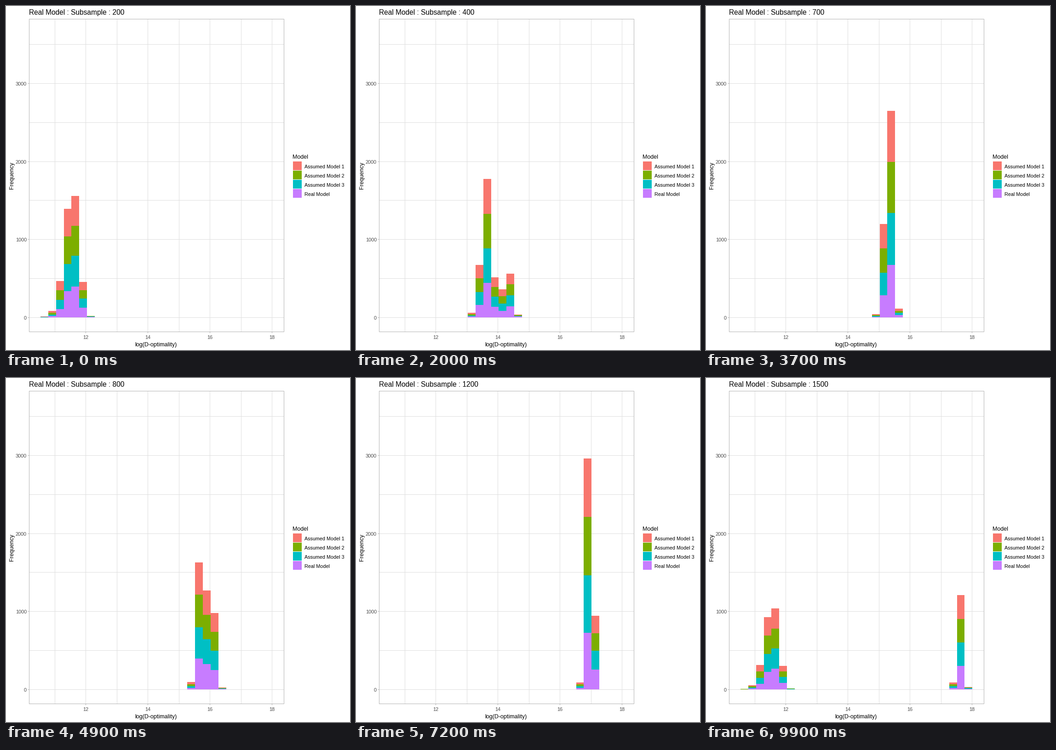
Animation of 748x748 px, one loop 10000 ms. Source, as a matplotlib script:

```python
import math

import numpy as np
import matplotlib.pyplot as plt
from matplotlib.animation import FuncAnimation
from matplotlib.patches import Rectangle

plt.rcParams["font.family"] = ["Liberation Sans", "DejaVu Sans"]

SIDE, DPI = 748, 64
PT = 72 / DPI
FRAMES, STEP_MS = 100, 100
BINS, BIN_X, BIN_W = 30, 75.3, 16.8
BASE, UNIT = 677.4, 0.16972
LEFT, RIGHT, TOP, BOTTOM = 50.5, 604.5, 28.5, 708.5
GRID, FRAME, TICK = "#DEDEDE", "#B3B3B3", "#4D4D4D"
SIZES = range(200, 1501, 100)
# name, colour and small offset of its curve, from the bottom of the stack up
MODELS = [
    ("Real Model", "#C77CFF", 0.05),
    ("Assumed Model 3", "#00BFC4", 0.02),
    ("Assumed Model 2", "#7CAE00", -0.04),
    ("Assumed Model 1", "#F8766D", -0.03),
]


def x_px(value):
    return 173.5 + (value - 12) * 67.5


def y_px(count):
    return BASE - count * UNIT


def crisp(v):
    return math.floor(v + 0.1) + 0.5


def bin_counts(size, shift):
    """1000 draws in bins: a skewed bell moving with log(size) and narrowing."""
    growth = math.log(size / 200)
    median = 4.02 + 12.14 * growth
    spread = math.exp(-0.12 - 0.55 * growth)
    u = np.clip((np.arange(BINS + 1) - median) / spread - shift, -8, 8)
    z = u + 0.06 * u ** 2
    return 1000 * np.diff([0.5 * (1 + math.erf(v / math.sqrt(2))) for v in z])


def stack(size):
    """Stacked levels of the four models in each bin."""
    tops = np.cumsum([bin_counts(size, m[2]) for m in MODELS], axis=0).T
    tops[tops[:, -1] < 7] = 0
    return tops


STATES = [stack(size) for size in SIZES]

fig = plt.figure(figsize=(SIDE / DPI, SIDE / DPI), dpi=DPI, facecolor="white")
ax = fig.add_axes([0, 0, 1, 1])
ax.set_xlim(0, SIDE)
ax.set_ylim(SIDE, 0)
ax.axis("off")


def text(x, y, s, px, color="black", **kw):
    return ax.text(x, y, s, fontsize=px * PT, color=color, **kw)


def line(xs, ys, color, z):
    ax.plot(xs, ys, color=color, lw=PT, zorder=z, snap=False,
            solid_capstyle="butt", solid_joinstyle="miter")


def rect(x, y, w, h, color, z):
    return ax.add_patch(Rectangle((x, y), w, h, fc=color, ec="none", lw=0,
                                  zorder=z, antialiased=False))


for value in range(11, 19):
    x = crisp(x_px(value))
    line([x, x], [TOP, BOTTOM], GRID, 1)
    if value % 2 == 0:
        line([x, x], [BOTTOM, BOTTOM + 3], FRAME, 4)
        text(x, 723.5, str(value), 10.9, TICK, ha="center")
for count in range(0, 3501, 500):
    y = crisp(y_px(count))
    line([LEFT, RIGHT], [y, y], GRID, 1)
    if count % 1000 == 0:
        line([LEFT - 3, LEFT], [y, y], FRAME, 4)
        text(45, y + 4.5, str(count), 10.9, TICK, ha="right")
line([LEFT, RIGHT, RIGHT, LEFT, LEFT], [TOP, TOP, BOTTOM, BOTTOM, TOP], FRAME, 4)

title = text(50, 19, "", 15.5)
text(325.5, 740, "log(D-optimality)", 12.5, ha="center")
text(13.4, 368, "Frequency", 12.5, rotation=90, ha="center", va="center")
text(623, 331.5, "Model", 12.5)
for i, (name, color, _) in enumerate(reversed(MODELS)):
    rect(624, 338 + 20 * i, 19, 19, color, 2)
    text(649, 353 + 20 * i, name, 10.75)

bars = [[rect(BIN_X + BIN_W * b, BASE, BIN_W, 0, color, 3)
         for _, color, _ in MODELS] for b in range(BINS)]


def phase(frame):
    """Index of the current state and progress towards the next one."""
    for s in range(len(STATES)):
        start, steps = (4 + 8 * s, 4) if s < 3 else (7 + 7 * s, 3)
        t = (frame - start + 1) / steps
        if t < 1:
            return s, max(t, 0)
    return 0, 0


def draw(frame):
    s, t = phase(frame)
    now = (1 - t) * STATES[s] + t * STATES[(s + 1) % len(STATES)]
    for column, tops in zip(bars, now):
        low = 0
        for bar, top in zip(column, tops):
            bar.set_y(y_px(top))
            bar.set_height((top - low) * UNIT)
            bar.set_visible(top - low > 0.5)
            low = top
    title.set_text(f"Real Model : Subsample : {SIZES[s]}")
    return [title]


anim = FuncAnimation(fig, draw, frames=FRAMES, interval=STEP_MS,
                     init_func=lambda: draw(0), repeat=True, repeat_delay=0)
plt.show()
```
